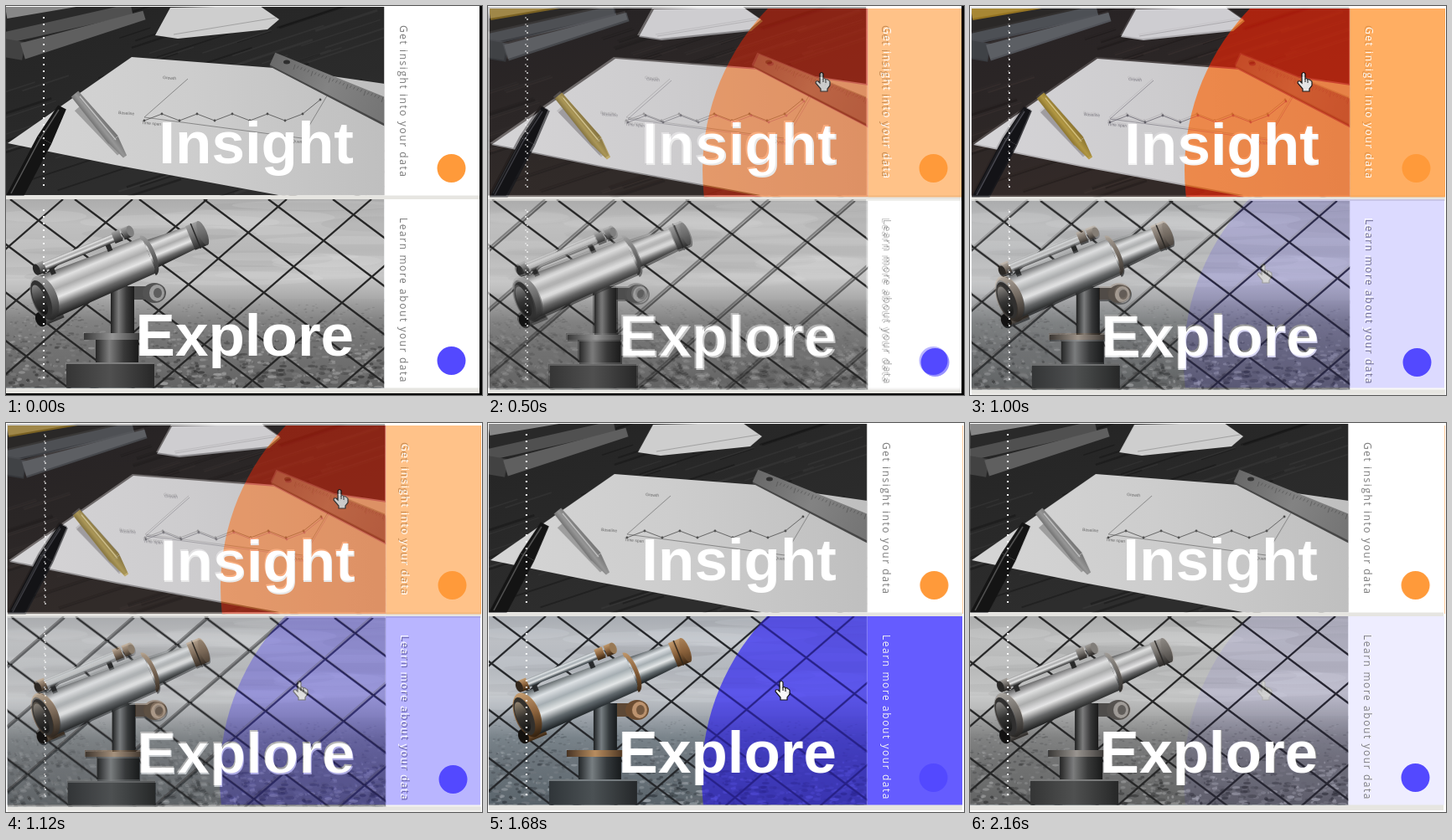
Write an HTML page with a canvas that moves like this. It is 568 by 465 pixels and loops after 2.22 s.

```html
<!DOCTYPE html>
<html lang="en">
<head>
<meta charset="utf-8">
<title>Hover cards</title>
<style>
html, body { margin: 0; width: 100%; height: 100%; overflow: hidden; background: #fff; }
canvas { display: block; }
</style>
</head>
<body>
<canvas id="stage" width="568" height="465"></canvas>
<script>
const W = 568, H = 465, PHOTO_W = 451.5, CARD_W = 565, CARD_H = 225.5;
let g;

function random(seed) {
  return () => (seed = (seed * 16807) % 2147483647) / 2147483647;
}

function rect(color, x, y, w, h) {
  g.fillStyle = color;
  g.fillRect(x, y, w, h);
}

// Flat list of x, y pairs
function trace(pts) {
  g.beginPath();
  for (let i = 0; i < pts.length; i += 2) g.lineTo(pts[i], pts[i + 1]);
}

function poly(color, ...pts) {
  trace(pts);
  g.fillStyle = color;
  g.fill();
}

function line(color, width, ...pts) {
  trace(pts);
  g.strokeStyle = color;
  g.lineWidth = width;
  g.stroke();
}

// Straight bar whose width runs from w0 to w1
function bar(color, x0, y0, x1, y1, w0, w1 = w0) {
  const a = Math.atan2(y1 - y0, x1 - x0), nx = -Math.sin(a) / 2, ny = Math.cos(a) / 2;
  poly(color, x0 + nx * w0, y0 + ny * w0, x0 - nx * w0, y0 - ny * w0,
    x1 - nx * w1, y1 - ny * w1, x1 + nx * w1, y1 + ny * w1);
}

function oval(color, x, y, rx, ry = rx) {
  g.beginPath();
  g.ellipse(x, y, rx, ry, 0, 0, 7);
  g.fillStyle = color;
  g.fill();
}

function ramp(x0, y0, x1, y1, ...colors) {
  const r = g.createLinearGradient(x0, y0, x1, y1);
  colors.forEach((c, i) => r.addColorStop(i / (colors.length - 1), c));
  return r;
}

// Shading across a tube that lies on the x axis, or stands at x
const across = (r, colors, y = 0) => ramp(0, y - r, 0, y + r, ...colors);
const upright = (x, r, colors) => ramp(x - r, 0, x + r, 0, ...colors);

function label(text, x, y) {
  g.save();
  g.translate(x, y);
  g.rotate(.08);
  g.font = '5px Arial, "Liberation Sans", sans-serif';
  g.fillStyle = '#66646e';
  g.fillText(text, 0, 0);
  g.restore();
}

function desk() {
  const rnd = random(7);
  rect(ramp(0, 0, 60, 226, '#272224', '#2d2626', '#352a27'), 0, 0, 452, 226);
  for (let i = 0; i < 110; i++) {
    const x = rnd() * 480 - 60, y = rnd() * 250, len = 30 + rnd() * 90;
    bar(rnd() < .5 ? 'rgba(100,82,76,.2)' : 'rgba(8,5,6,.28)',
      x, y, x + len, y - len * .33, 1 + rnd() * 2);
  }

  // Books
  bar('#2b2827', 0, 24, 140, -8, 18);
  bar('#b0871f', 0, 7, 95, -9, 16);
  bar('#4d5057', -5, 39, 150, 4, 14);
  bar('#3f4248', -2, 50, 21, 54, 22);
  bar('#5c5f66', 20, 54, 165, 11, 20, 11);

  // Loose sheets
  poly('#cfcdd2', 196, 2, 303, 0, 326, 16, 312, 28, 205, 39, 178, 35);
  line('#a3a1a6', 1, 200, 34, 322, 14);

  // Chart sheet
  poly(ramp(0, 160, 450, 130, '#d6d4d8', '#cecccf', '#c0bec2'),
    150, 61, 320, 74, 452, 93, 452, 226, 325, 226, 130, 190, 2, 164);
  line('#77747e', .8, 217, 87, 165, 133, 353, 158, 385, 104);
  const curve = [];
  for (let i = 0; i <= 10; i++) {
    const x = 165 + 21 * i, y = i < 10 ? 133 + (i % 2 ? -4 : 4) : 112;
    curve.push(x, y);
    oval('#45434d', x, y, 1.4);
  }
  line('#5b5964', .9, ...curve);
  label('Growth', 187, 87);
  label('Baseline', 134, 129);
  label('Time span', 162, 141);
  label('Quarter', 341, 163);

  // Ruler
  bar('#474548', 318, 65, 462, 132, 16, 30);
  bar(ramp(320, 60, 451, 125, '#6b686b', '#858285', '#777477'), 318, 63, 462, 129, 16, 30);
  oval('#302d30', 335, 67, 4, 2.5);
  for (let i = 0; i < 26; i++) {
    const x = 345 + i * 4.2, y = 70 + i * 1.56;
    line('#4e4b4e', .6, x, y, x - 2, y + (i % 5 ? 3 : 6));
  }

  // Pens
  const body = ramp(97, 138, 111, 127, '#7b6116', '#b9982f', '#8f721d');
  bar('rgba(40,35,40,.3)', 88, 120, 136, 176, 16, 8);
  bar(body, 82, 105, 128, 160, 11, 15);
  bar(body, 128, 160, 142, 180, 14, 5);
  line('#dec673', 1.2, 88, 108, 131, 160);
  bar('#131318', 67, 121, 46, 160, 11, 19);
  bar('#131318', 46, 160, 8, 232, 19);
  line('#55555f', 1.5, 63, 124, 40, 160, 6, 224);
}

function telescope() {
  const gold = ['#c69a69', '#8f6237', '#38230f'];
  const steel = ['#646c70', '#dde2e5', '#a5aeb3', '#e4e7e8', '#60696e', '#1d2326'];
  const iron = ['#1c2022', '#777f83', '#343a3d', '#171b1d'];

  // Stand
  rect(upright(139, 14, iron), 125, 335, 28, 65);
  rect(upright(132, 26, iron), 107, 398, 51, 32);
  rect(upright(127, 34, ['#493321', '#bd8d5a', '#4b321d']), 93, 391, 68, 8);
  rect(upright(124, 52, ['#30363a', '#4b5255', '#25292b']), 72, 426, 105, 32);
  line('#899194', 1.5, 72, 427, 177, 427);

  // Side knob
  rect('#5f4833', 153, 335, 23, 16);
  oval('#6e4c2d', 177, 343, 14, 12);
  oval('#c0936a', 180, 343, 9, 10);
  oval('#77583c', 181, 343, 5, 6);

  g.save();
  g.translate(46, 349);
  g.rotate(-.39);

  // Eyepiece
  bar(across(9, gold, 22), -15, 22, 13, 22, 17);
  oval('#15110e', -14, 22, 6, 9);

  // Main tube
  const brass = across(27, gold);
  bar(across(26, steel), 0, 0, 135, 0, 54, 46);
  bar(across(17, steel), 135, 0, 195, 0, 36, 28);
  oval(brass, 0, 0, 15, 28);
  oval('#34302c', -4, 0, 10, 24);
  oval(across(20, ['#998770', '#383530', '#131313']), -6, 0, 7, 19);
  g.beginPath();
  g.ellipse(133, 0, 7, 23, 0, -1.57, 1.57);
  g.strokeStyle = brass;
  g.lineWidth = 5;
  g.stroke();
  bar(across(16, gold), 188, 0, 204, 0, 31);
  oval(brass, 204, 0, 5, 15.5);
  line('#332719', 1.5, 195, -16, 195, 16);

  // Finder
  for (const x of [21, 94]) bar('#282b2d', x, -34, x, -22, 6);
  bar(across(6, steel, -35), 10, -35, 114, -35, 10);
  for (const x of [10, 108, 120]) bar(across(7, gold, -35), x - 5, -35, x + 5, -35, 14);
  oval('#33261a', 4, -35, 4, 7);
  oval('#9c7951', 125, -35, 4, 7);
  g.restore();
}

function view() {
  const rnd = random(21);
  rect(ramp(0, 231, 0, 353, '#a8adb3', '#bcc0c5', '#b4b9bf', '#c4c8cc', '#a0a7ae'), 0, 231, 452, 123);
  for (let i = 0; i < 24; i++)
    oval(rnd() < .5 ? 'rgba(225,228,232,.16)' : 'rgba(125,131,140,.11)',
      rnd() * 450, 235 + rnd() * 100, 50 + rnd() * 70, 4 + rnd() * 8);
  rect(ramp(0, 350, 0, 458, '#a0a7ae', '#78838b', '#6b757d', '#646f77', '#58636b'), 0, 350, 452, 108);
  for (let i = 0; i < 1500; i++) {
    const d = rnd(), v = 35 + rnd() * 145;
    oval(`rgba(${v},${v + 7},${v + 13},${.15 + d * .5})`,
      rnd() * 452, 355 + d * 103, 1 + rnd() * (1 + d * 4), .6 + d * 1.4);
  }

  // Wire mesh: even one way, slowly widening the other
  for (let k = -6; k < 3; k++) {
    const x = 236 + 77 * k;
    line('#24262a', 2.3, x, 231, x + 304, 459);
  }
  for (let k = -2; k < 5; k++) {
    const x = 240 + 92 * k + 3 * k * k;
    line('#24262a', 2.3, x, 231, x - 262, 459);
  }
  telescope();
}

const cards = [
  { y: 1, photo: desk, title: 'Insight', note: 'Get insight into your data',
    color: '#ff9a3a', mul: 'rgb(66,135,51)', add: 'rgb(192,14,2)' },
  { y: 231, photo: view, title: 'Explore', note: 'Learn more about your data',
    color: '#5349ff', mul: 'rgb(64,64,140)', add: 'rgb(30,22,125)' }
];

function drawCard(card, active) {
  const { y } = card, cy = y + 193;
  g.save();
  g.beginPath();
  g.rect(0, y, PHOTO_W, CARD_H);
  g.clip();
  card.photo();
  if (active) {
    g.beginPath();
    g.arc(532, cy, 278, 0, 7);
    g.clip();
    g.globalCompositeOperation = 'multiply';
    rect(card.mul, 0, y, W, CARD_H);
    g.globalCompositeOperation = 'lighter';
    rect(card.add, 0, y, W, CARD_H);
  } else {
    g.globalCompositeOperation = 'saturation';
    rect('#888', 0, y, W, CARD_H);
  }
  g.restore();

  rect(active ? card.color : '#fff', PHOTO_W, y, CARD_W - PHOTO_W, CARD_H);
  oval(card.color, 531.5, cy, 17);
  for (let dot = 12; dot < 214; dot += 8) rect('#fff', 44, y + dot, 2, 2);

  g.fillStyle = '#fff';
  g.font = 'bold 71px Arial, "Liberation Sans", sans-serif';
  g.textAlign = 'right';
  g.fillText(card.title, 415, y + 187);
  g.textAlign = 'left';

  g.save();
  g.translate(469.5, y + 22);
  g.rotate(Math.PI / 2);
  g.font = '12px "Open Sans", sans-serif';
  g.letterSpacing = '1.56px';
  g.fillStyle = active ? '#fff' : '#777';
  g.fillText(card.note, 0, 0);
  g.restore();
}

function drawHand(x, y) {
  const hand = new Path2D('M6 2Q8 -1 10 2V8Q12 7 13 9Q15 8 16 10Q18 10 18 12V16L15 20V23H7V20L1 13Q1 10 4 11L6 13Z');
  g.save();
  g.translate(x, y);
  g.fillStyle = '#fff';
  g.fill(hand);
  g.strokeStyle = '#000';
  g.lineWidth = 1.2;
  g.stroke(hand);
  line('#000', 1, 10, 8, 10, 12);
  line('#000', 1, 13, 9, 13, 13);
  g.restore();
}

function makeState(dx, dy, active, hand) {
  const c = document.createElement('canvas');
  c.width = W;
  c.height = H;
  g = c.getContext('2d');
  rect('#fff', 0, 0, W, H);
  g.save();
  g.translate(dx, dy);
  rect('#e6e5e1', 0, 226, CARD_W, 5);
  rect('#e6e5e1', 0, 456, CARD_W, 7);
  cards.forEach((card, i) => drawCard(card, i === active));
  g.restore();
  if (hand) drawHand(...hand);
  return c;
}

const states = [
  makeState(0, 0, -1),
  makeState(2, 2, 0, [390, 79]),
  makeState(1, 0, 1, [342, 308])
];
const stage = document.getElementById('stage').getContext('2d');

// Each state holds for 200 ms, then fades to the next in tenths every 60 ms
function frame(now) {
  const t = now % 2220, i = Math.floor(t / 740), u = t % 740;
  const step = u < 200 ? 0 : Math.floor((u - 200) / 60) + 1;
  g = stage;
  g.drawImage(states[i], 0, 0);
  g.globalAlpha = step / 10;
  g.drawImage(states[(i + 1) % 3], 0, 0);
  g.globalAlpha = 1;
  if (i === 0) {
    rect('#000', 565, 0, 3, H);
    rect('#000', 0, 463, W, 2);
  } else {
    rect('rgba(255,154,58,.5)', 566, 3, 1, 225);
  }
  requestAnimationFrame(frame);
}
requestAnimationFrame(frame);
</script>
</body>
</html>
```
